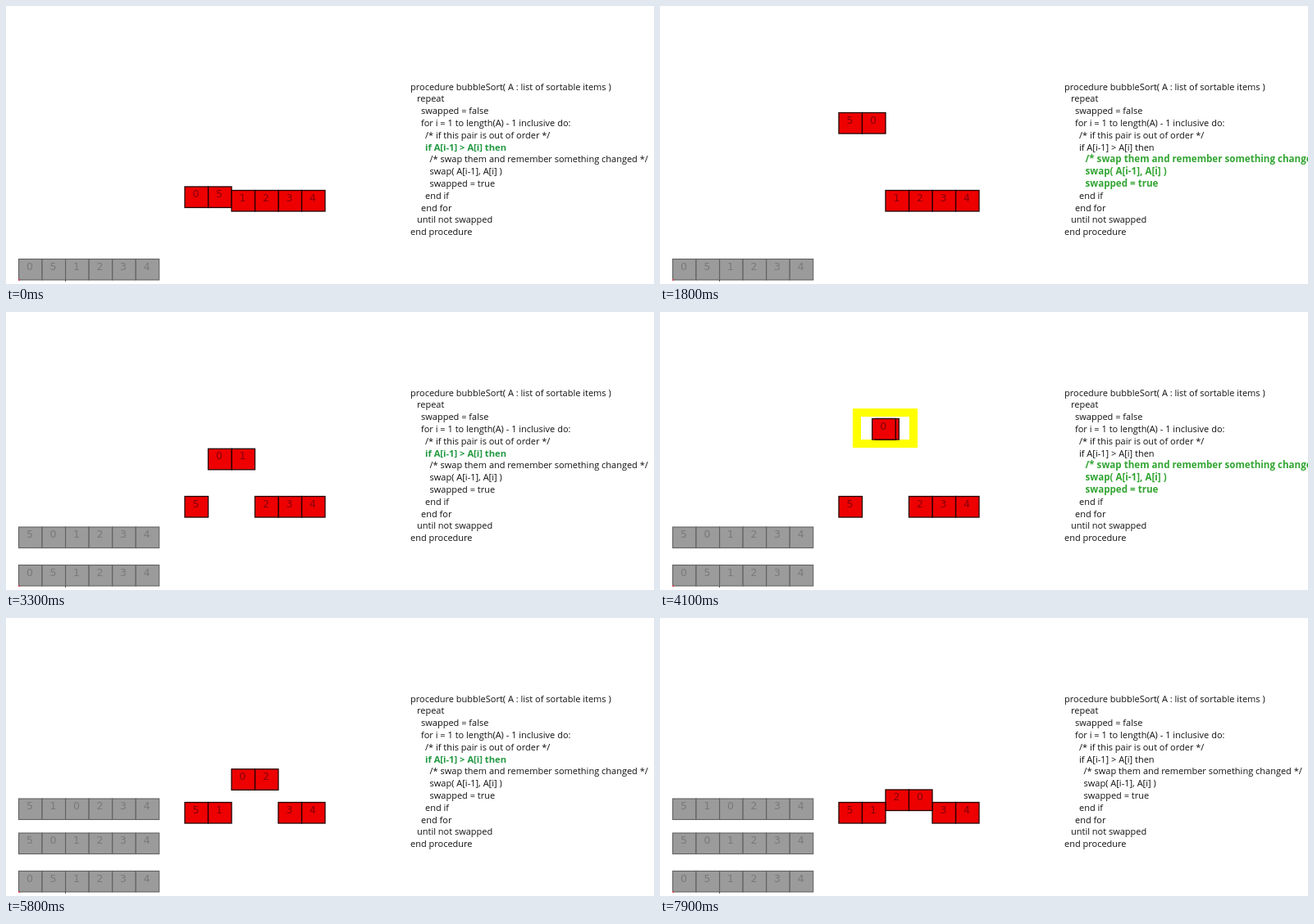
An HTML page that plays this animation: 790x340 px, repeating every 8000 ms.

```html
<!DOCTYPE html>
<html lang="en">
<head>
<meta charset="utf-8">
<title>Bubble sort</title>
<style>
  html, body { margin: 0; width: 100%; height: 100%; overflow: hidden; background: #fff; }
  svg { display: block; width: 790px; height: 340px; }
  .code { font: 11px "Open Sans", "Noto Sans", sans-serif; fill: #111; white-space: pre; }
  .code.test { font-weight: 700; font-size: 11.2px; fill: #1f9840; }
  .code.swap { font-weight: 700; font-size: 11.6px; fill: #32a532; }
  .tile text { font: 12.5px "DejaVu Sans", sans-serif; text-anchor: middle; }
  .live rect { fill: #ee0000; stroke: #240000; stroke-width: 1.3; }
  .live text { fill: #85000c; }
  .past rect { fill: #9b9b9b; stroke: #616161; stroke-width: 1.1; }
  .past text { fill: #7a7a7a; }
</style>
</head>
<body>
<svg id="stage" viewBox="0 0 790 340"></svg>
<script>
const LOOP = 8000, STEP = 100, ROUND = 2700;
const PITCH = 28.5, LEFT = 218, REST = 225;
const ORDERS = ['051234', '501234', '510234'];
const PAST_TOP = [309, 262.5, 220.5];
const FRAME_TOP = [120, 118, 118];

// [time in the round, top of the lifted pair]
const LIFT = [[0, 220.5], [400, 184.3], [900, 140.5], [1000, 140], [1100, 130],
              [1900, 130], [2500, 209.5], [2600, 222], [2700, 220.5]];

// [x, text, state that highlights the line]
const CODE = [
  [493, 'procedure bubbleSort( A : list of sortable items )'],
  [501, 'repeat'],
  [506, 'swapped = false'],
  [506, 'for i = 1 to length(A) - 1 inclusive do:'],
  [511, '/* if this pair is out of order */'],
  [511, 'if A[i-1] > A[i] then', 'test'],
  [516.5, '/* swap them and remember something changed */', 'swap'],
  [516.5, 'swap( A[i-1], A[i] )', 'swap'],
  [516.5, 'swapped = true', 'swap'],
  [511, 'end if'],
  [506, 'end for'],
  [501, 'until not swapped'],
  [493, 'end procedure']
];

const stage = document.getElementById('stage');

function add(parent, tag, attrs, text) {
  const el = document.createElementNS('http://www.w3.org/2000/svg', tag);
  for (const name in attrs) el.setAttribute(name, attrs[name]);
  if (text) el.textContent = text;
  return parent.appendChild(el);
}

function place(el, x, y) {
  el.setAttribute('transform', `translate(${x} ${y})`);
}

function addTile(parent, digit, kind) {
  const g = add(parent, 'g', { class: 'tile ' + kind });
  add(g, 'rect', { x: 0, y: 0.5, width: PITCH, height: 25.5 });
  add(g, 'text', { x: 13.4, y: 13.7 }, digit);
  return g;
}

const pastRows = ORDERS.map((order, r) => {
  const row = add(stage, 'g', {});
  [...order].forEach((d, i) => place(addTile(row, d, 'past'), 15.5 + i * 28.55, PAST_TOP[r]));
  return row;
});
add(stage, 'rect', { x: 15, y: 334, width: 2, height: 2, fill: '#d05060' });
add(stage, 'rect', { x: 72, y: 335, width: 1, height: 2, fill: '#555' });

const marker = add(stage, 'rect', {
  width: 69, height: 38, fill: '#fff', stroke: '#ffff00', 'stroke-width': 10
});

// The zero passes in front of the others, so it is added last.
const tiles = {};
for (const d of '543210') tiles[d] = addTile(stage, d, 'live');

const lines = CODE.map(([x, text, on], i) => ({
  x, on, el: add(stage, 'text', { class: 'code', x, y: 102.5 + i * 14.8 }, text)
}));

function liftAt(p) {
  const i = LIFT.findIndex(([t]) => t > p);
  const [t0, y0] = LIFT[i - 1], [t1, y1] = LIFT[i];
  return y0 + (y1 - y0) * (p - t0) / (t1 - t0);
}

function draw(time) {
  const t = Math.floor(time % LOOP / STEP) * STEP;
  const round = Math.floor(t / ROUND);
  const p = t % ROUND;
  const cross = Math.min(1, Math.max(0, (p - 1100) / 700));
  const top = liftAt(p);

  [...ORDERS[round]].forEach((d, i) => {
    const side = i === round ? 1 : i === round + 1 ? -1 : 0;
    place(tiles[d], LEFT + (i + side * cross) * PITCH, side ? top : REST);
  });

  marker.setAttribute('x', LEFT + round * PITCH - 6.5);
  marker.setAttribute('y', FRAME_TOP[round] + 5);
  marker.style.display = p >= 1100 && p < 1500 ? '' : 'none';

  pastRows.forEach((row, r) => {
    row.style.display = r === 0 || t > r * ROUND ? '' : 'none';
  });

  const state = p < 900 ? 'test' : p < 1900 ? 'swap' : '';
  for (const { x, on, el } of lines) {
    const lit = on && on === state;
    el.setAttribute('class', lit ? 'code ' + on : 'code');
    el.setAttribute('x', lit && on === 'swap' ? x + 2 : x);
  }
}

const start = performance.now();
function tick() {
  draw(performance.now() - start);
  requestAnimationFrame(tick);
}
tick();
</script>
</body>
</html>
```
